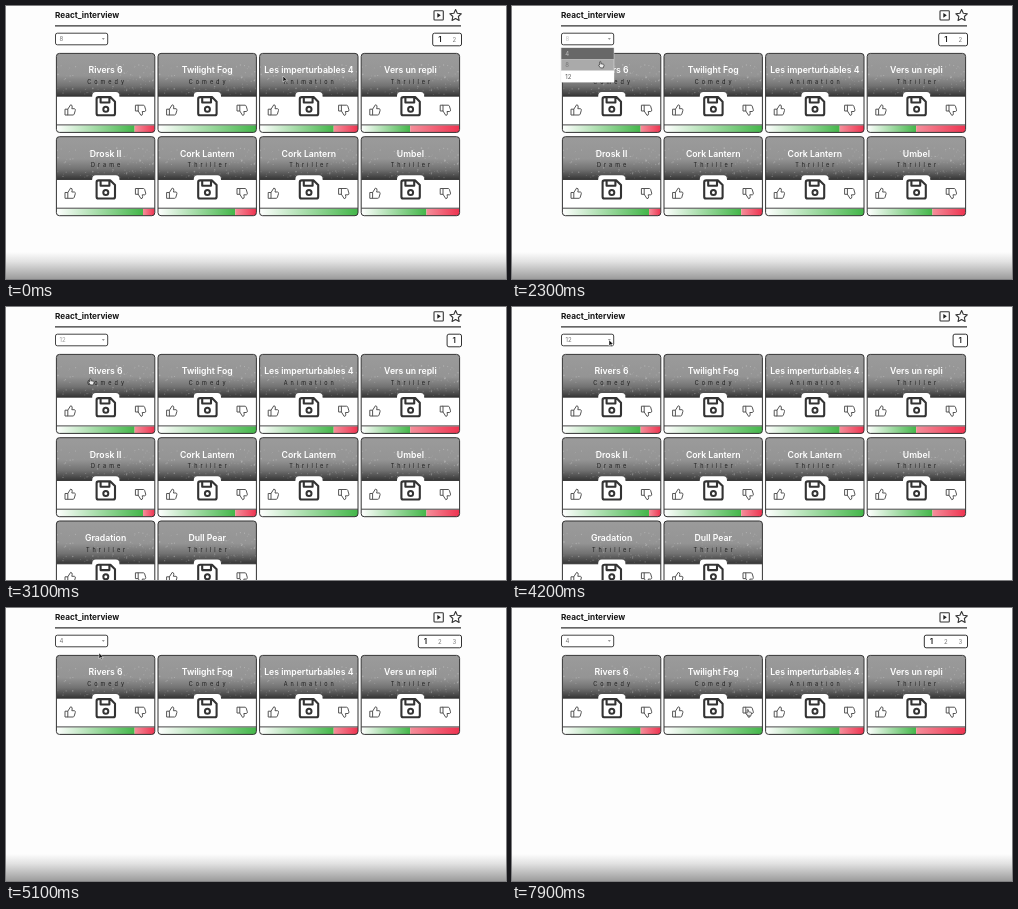
Recreate the animation shown at these times as an HTML page. Size 500x273 px, loop 8 s.

```html
<!DOCTYPE html>
<html lang="en">
<head>
<meta charset="utf-8">
<title>React_interview</title>
<style>
html, body { margin: 0; width: 100%; height: 100%; overflow: hidden; background: #fdfdfd; }
svg { display: block; width: 100%; height: 100%; }
text { font-family: Inter, "Liberation Sans", sans-serif; }
.name { font-size: 8.7px; font-weight: 600; fill: #fff; text-anchor: middle; }
.genre { font-size: 5.5px; letter-spacing: 3px; fill: #1c1c1c; text-anchor: middle; }
.small { font-size: 6px; }
.page { font-size: 6px; text-anchor: middle; fill: #777; }
.page.on { font-size: 8px; font-weight: 600; fill: #222; }
.line { fill: none; stroke: #333; stroke-linejoin: round; stroke-linecap: round; }
</style>
</head>
<body>
<svg id="stage" viewBox="0 0 500 273">
  <defs>
    <linearGradient id="shade" x2="0" y2="1">
      <stop offset="0" stop-color="#9b9b9b"/>
      <stop offset=".52" stop-color="#949494"/>
      <stop offset=".76" stop-color="#727272"/>
      <stop offset="1" stop-color="#353535"/>
    </linearGradient>
    <linearGradient id="green">
      <stop offset="0" stop-color="#fff"/>
      <stop offset="1" stop-color="#43b649"/>
    </linearGradient>
    <linearGradient id="red">
      <stop offset="0" stop-color="#f58e9a"/>
      <stop offset="1" stop-color="#ee3350"/>
    </linearGradient>
    <linearGradient id="fade" x2="0" y2="1">
      <stop offset="0" stop-color="#fdfdfd"/>
      <stop offset=".35" stop-color="#e2e2e2"/>
      <stop offset="1" stop-color="#9c9c9c"/>
    </linearGradient>
    <clipPath id="round"><rect width="98.4" height="79" rx="3"/></clipPath>
    <g id="thumb" class="line" style="stroke:#555">
      <path d="M-5 -.8h2.4v5.8h-2.4zM-2.6 -.8L.2 -5.2Q2.1 -5.1 1.8 -3L1.4 -1.3H4Q5.2 -1 4.9 .4L3.8 4.1Q3.4 5 2.6 5H-2.6"/>
    </g>
    <g id="save">
      <path d="M-13.6 6V-10Q-13.6 -14 -10 -14H10Q13.6 -14 13.6 -10V6z" fill="#fff"/>
      <path class="line" stroke-width="2.1" d="M-7.2 -8.9H4.6L9.2 -4.3V7.4Q9.2 9.2 7.4 9.2H-7.4Q-9.2 9.2 -9.2 7.4V-7.1Q-9.2 -8.9 -7.2 -8.9zM-5.2 -8.5V-3.5H3.6V-8.5"/>
      <circle class="line" stroke-width="2" cy="3.2" r="2.5"/>
    </g>
    <g id="photo"></g>
  </defs>
  <rect width="500" height="273" fill="#fdfdfd"/>
  <rect id="foot" y="246" width="500" height="27" fill="url(#fade)"/>
  <text x="49" y="12.3" font-size="8.2" font-weight="700" fill="#161616">React_interview</text>
  <path d="M49 19.9H455" stroke="#333" stroke-width="1.2"/>
  <rect class="line" x="428" y="4.7" width="9.3" height="9.3" rx=".8" stroke-width="1.1"/>
  <path d="M431.3 6.9v4.9l3.5 -2.45z" fill="#222"/>
  <path id="star" class="line" stroke-width="1.1"/>
  <g id="cards"></g>
  <rect x="49.5" y="27.2" width="52.2" height="11.6" rx="1.8" fill="#fff" stroke="#444"/>
  <text id="value" class="small" x="53.6" y="35.2"></text>
  <path d="M95.8 32.2l1.5 1.6 1.5 -1.6z" fill="#777"/>
  <g id="pager"></g>
  <g id="menu"></g>
  <path id="arrow" d="M0 0V5.8L1.5 4.5 2.5 6.7 3.5 6.2 2.5 4.1H4.3z" fill="#111" stroke="#fff" stroke-width=".5"/>
  <path id="hand" d="M1.2 4V.8Q1.8 0 2.4 .8V2.7L5 3.3Q5.8 3.6 5.5 4.6L4.8 6.9H2L.1 4.4Q.2 3.4 1.2 4z" fill="#eee" stroke="#333" stroke-width=".7"/>
</svg>
<script>
const LOOP = 8000, STEP = 100, ROW = 11.4;
const films = [
  ["Rivers 6", "Comedy", .795], ["Twilight Fog", "Comedy", 1],
  ["Les imperturbables 4", "Animation", .753], ["Vers un repli", "Thriller", .498],
  ["Drosk II", "Drame", .88], ["Cork Lantern", "Thriller", .785],
  ["Cork Lantern", "Thriller", 1], ["Umbel", "Thriller", .663],
  ["Gradation", "Thriller", .8], ["Dull Pear", "Thriller", .9]
];
const sizes = [4, 8, 12];
// open/close times of the menu, selected row, and hover spans [from, to, row]
const menus = [
  { open: 1600, close: 2900, pick: 1, settle: 400, hover: [[1850, 2222, 0], [2250, 2550, 1], [2550, 3200, 2]] },
  { open: 4350, close: 5000, pick: 2, settle: 100, hover: [[4580, 5300, 0]] }
];
// pointer stops: time, x, y
const path = [
  [0, 277, 70], [900, 98, 32], [1500, 97, 31], [1900, 92, 37], [2300, 86.5, 55],
  [2600, 85, 68], [2900, 82.5, 71], [3600, 82.5, 71], [4200, 97, 33], [4500, 97, 34],
  [4800, 93, 45], [5400, 93, 45], [6300, 296, 25], [6400, 323, 30.5], [6600, 323, 30.5],
  [7100, 355, 31], [7200, 355, 31], [7500, 243, 44], [7600, 243, 44], [7900, 234, 101]
];

const $ = id => document.getElementById(id);
const clamp = v => Math.max(0, Math.min(1, v));
const mix = (a, b, k) => a + (b - a) * k;
const grey = v => `rgb(${[v, v, v].map(Math.round)})`;

let seed = 11;
const rand = () => (seed = seed * 16807 % 2147483647) / 2147483647;

function photo() {
  let s = '<rect width="98.4" height="42.8" fill="url(#shade)"/>';
  for (let i = 0; i < 120; i++) {
    const x = rand() * 98, y = 43 * (.25 + .72 * rand());
    s += `<circle cx="${x.toFixed(1)}" cy="${y.toFixed(1)}" r="${mix(.35, .85, rand()).toFixed(2)}" fill="#ddd" opacity="${mix(.12, .4, rand()).toFixed(2)}"/>`;
  }
  return s;
}

function card([name, genre, likes], i) {
  const x = 50.4 + i % 4 * 101.6, y = 47.4 + Math.floor(i / 4) * 83.3, w = 98.4 * likes;
  return `<g transform="translate(${x} ${y})">
    <g clip-path="url(#round)">
      <rect width="98.4" height="79" fill="#fff"/>
      <use href="#photo"/>
      <rect y="72" width="${w}" height="8" fill="url(#green)"/>
      ${likes < 1 ? `<rect x="${w}" y="72" width="${98.4 - w}" height="8" fill="url(#red)"/>` : ""}
      <path d="M0 42.8H99M0 71.5H99" stroke="#333" stroke-width=".9"/>
    </g>
    <rect width="98.4" height="79" rx="3" fill="none" stroke="#333"/>
    <text class="name" x="49.2" y="20">${name}</text>
    <text class="genre" x="50.7" y="30.6">${genre}</text>
    <use href="#thumb" x="14" y="56.6"/>
    <use href="#thumb" transform="translate(84.4 56.8) scale(1 -1)"/>
    <use href="#save" x="49.4" y="52.6"/>
  </g>`;
}

function pager(n) {
  const w = n * 14.4, x = 455.5 - w;
  let s = `<rect x="${x}" y="27.2" width="${w}" height="12.6" rx="1.8" fill="#fff" stroke="#333"/>`;
  for (let i = 0; i < n; i++)
    s += `<text class="page ${i ? "" : "on"}" x="${x + 7.2 + i * 14.4}" y="${i ? 35.6 : 36.3}">${i + 1}</text>`;
  return s;
}

function menu(m, t) {
  const show = clamp((t - m.open) / 150) * (1 - clamp((t - m.close) / 100));
  if (!show) return "";
  let s = `<g opacity="${show}"><rect x="49" y="41.9" width="53" height="${ROW * 3}" fill="#fff" stroke="#ddd" stroke-width=".5"/>`;
  sizes.forEach((n, i) => {
    let k = 0;
    for (const [from, to, row] of m.hover)
      if (row === i) k += clamp((t - from) / 250) - clamp((t - to) / 250);
    const y = 41.9 + i * ROW;
    s += `<rect x="49.3" y="${y}" width="52.5" height="${ROW}" fill="${grey(mix(i === m.pick ? 204 : 255, 34, k))}"/>
      <text class="small" x="53.2" y="${y + 7.9}" fill="${grey(mix(85, 240, k))}">${n}</text>`;
  });
  return s + "</g>";
}

function pointer(t) {
  const i = Math.max(1, path.findIndex(p => p[0] >= t));
  const [t0, x0, y0] = path[i - 1], [t1, x1, y1] = path[i];
  let k = clamp((t - t0) / (t1 - t0));
  k = k * k * (3 - 2 * k);
  return `translate(${mix(x0, x1, k)} ${mix(y0, y1, k)})`;
}

let shown = 0;
function draw(t) {
  const size = t < 2900 ? 8 : t < 5000 ? 12 : 4;
  if (size !== shown) {
    shown = size;
    $("cards").innerHTML = films.slice(0, size).map(card).join("");
    $("pager").innerHTML = pager(Math.ceil(films.length / size));
    $("foot").style.display = size === 12 ? "none" : "";
    $("value").textContent = size;
  }
  let dim = 0;
  for (const m of menus) dim += clamp((t - m.open) / 200) - clamp((t - m.close) / m.settle);
  $("value").setAttribute("fill", grey(mix(115, 195, dim)));
  $("menu").innerHTML = menus.map(m => menu(m, t)).join("");
  const hand = t >= 1800 && t < 3700 || t >= 7900;
  $("hand").style.display = hand ? "" : "none";
  $("arrow").style.display = hand ? "none" : "";
  $(hand ? "hand" : "arrow").setAttribute("transform", pointer(t));
}

$("photo").innerHTML = photo();
$("star").setAttribute("d", "M" + Array.from({ length: 10 }, (_, i) => {
  const r = i % 2 ? 2.9 : 6, a = (i / 5 - .5) * Math.PI;
  return `${(449.6 + r * Math.cos(a)).toFixed(2)} ${(9.6 + r * Math.sin(a)).toFixed(2)}`;
}).join("L") + "Z");

const start = performance.now();
function tick() {
  const t = (performance.now() - start) % LOOP;
  draw(Math.floor(t / STEP) * STEP);
  requestAnimationFrame(tick);
}
tick();
</script>
</body>
</html>
```
